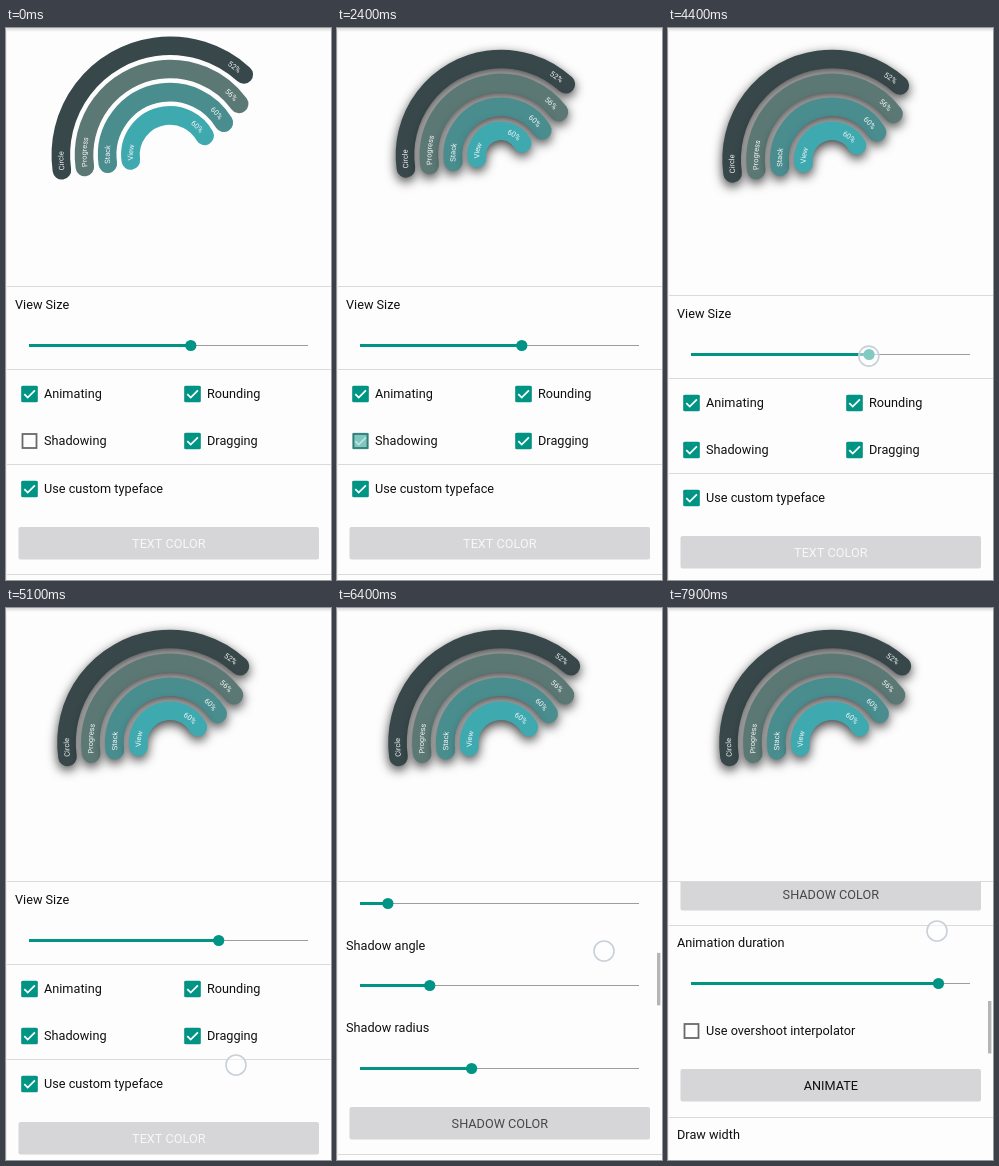
An HTML page with a canvas that plays this animation: 325x552 px, repeating every 8000 ms.

```html
<!DOCTYPE html>
<html lang="en">
<head>
<meta charset="utf-8">
<title>Arc progress settings</title>
<style>
  html, body { margin: 0; width: 100%; height: 100%; overflow: hidden; background: #fdfdfd; }
  canvas { display: block; width: 325px; height: 552px; }
</style>
</head>
<body>
<canvas id="stage"></canvas>
<script>
const W = 325, H = 552, LOOP = 8000, STEP = 100;
const TEAL = '#009485', INK = '#101010', PAPER = '#fdfdfd', RULE = '#dadada';
const RAD = Math.PI / 180, START = 172 * RAD, SLOP = 15;
const canvas = document.getElementById('stage');
const ctx = canvas.getContext('2d');
const dpr = window.devicePixelRatio || 1;
canvas.width = W * dpr;
canvas.height = H * dpr;

const ARCS = [
  { name: 'Circle', value: '52%', end: 312.5, color: '#37474a' },
  { name: 'Progress', value: '56%', end: 323.5, color: '#5b7874' },
  { name: 'Stack', value: '60%', end: 329, color: '#4a8d8f' },
  { name: 'View', value: '60%', end: 331, color: '#3fa9b0' }
];
const TAPS = [
  { start: 1200, end: 1300, from: [29, 433], to: [29, 443] },
  { start: 2200, end: 2300, from: [20, 423], to: [20, 423] }
];
// Each swipe drags the list, then flings it further until it rests
const SWIPES = [
  { start: 5100, end: 5600, from: [230, 457], to: [265, 340], fling: 81, rest: 6000 },
  { start: 6000, end: 6400, from: [250, 500], to: [267, 343], fling: 117, rest: 6900 },
  { start: 7400, end: 7900, from: [253, 450], to: [269, 323], fling: 0, rest: 8000 }
];

const ramp = (t, a, b) => Math.min(1, Math.max(0, (t - a) / (b - a)));
const smooth = p => p * p * (3 - 2 * p);
const easeOut = p => 1 - (1 - p) ** 2;
const mix = (a, b, p) => a + (b - a) * p;

const sizeAt = t => smooth(ramp(t, 3900, 4800));

function scrollAt(t) {
  return SWIPES.reduce((sum, s) => {
    const moved = (s.from[1] - s.to[1]) * ramp(t, s.start, s.end);
    return sum + Math.max(0, moved - SLOP) + s.fling * easeOut(ramp(t, s.end, s.rest));
  }, 0);
}

function barAlpha(t) {
  return Math.max(...SWIPES.map(s =>
    ramp(t, s.start, s.start + 100) * (1 - ramp(t, s.rest, s.rest + 200))));
}

function line(x1, y1, x2, y2, color, width) {
  ctx.strokeStyle = color;
  ctx.lineWidth = width;
  ctx.beginPath();
  ctx.moveTo(x1, y1);
  ctx.lineTo(x2, y2);
  ctx.stroke();
}

function disc(x, y, r, color) {
  ctx.fillStyle = color;
  ctx.beginPath();
  ctx.arc(x, y, r, 0, Math.PI * 2);
  ctx.fill();
}

function box(x, y, w, h, r, color) {
  ctx.fillStyle = color;
  ctx.beginPath();
  ctx.roundRect(x, y, w, h, r);
  ctx.fill();
}

function text(str, x, y, color = INK, align = 'left') {
  ctx.font = '12.7px Roboto, sans-serif';
  ctx.textAlign = align;
  ctx.fillStyle = color;
  ctx.fillText(str, x, Math.round(y + 4));
}

// Text along a circle; `angle` is where it starts, or ends if `fromEnd`
function arcText(str, r, angle, fromEnd) {
  ctx.font = '7.5px Roboto, sans-serif';
  ctx.textAlign = 'center';
  ctx.fillStyle = '#f2f6f6';
  let a = fromEnd ? angle - ctx.measureText(str).width / r : angle;
  for (const ch of str) {
    const w = ctx.measureText(ch).width / r;
    ctx.save();
    ctx.rotate(a + w / 2 + Math.PI / 2);
    ctx.fillText(ch, 0, 2.6 - r);
    ctx.restore();
    a += w;
  }
}

function chart(size, shadow) {
  const outer = (shadow ? 96 : 109.2) + 7.5 * size;
  const gap = shadow ? 23.9 : 23.2;
  ctx.save();
  ctx.translate(164, 127 + 7.5 * size);
  ctx.lineCap = 'round';
  ctx.lineWidth = 18.6;
  ARCS.forEach((arc, i) => {
    const r = outer - gap * i, end = arc.end * RAD;
    ctx.save();
    if (shadow) {
      ctx.shadowColor = 'rgba(0,0,0,.75)';
      ctx.shadowBlur = 11 * dpr;
      ctx.shadowOffsetY = 4 * dpr;
    }
    ctx.strokeStyle = arc.color;
    ctx.beginPath();
    ctx.arc(0, 0, r, START, end);
    ctx.stroke();
    ctx.restore();
    arcText(arc.name, r, START);
    arcText(arc.value, r, end - 5 / r, true);
  });
  ctx.restore();
}

function divider(y) {
  line(0, y, W, y, RULE, 1);
}

function slider(label, y, value) {
  const x = 23 + 279 * value, mid = Math.floor(y + 41) - .5;
  text(label, 9, y);
  line(23, mid, 302, mid, '#9c9e9e', 1);
  line(23, mid, x, mid, TEAL, 3);
  disc(x, mid, 5.6, TEAL);
}

function check(x, y, label, on) {
  ctx.strokeStyle = '#696969';
  ctx.lineWidth = 1.8;
  ctx.strokeRect(x - 7, y - 7, 14, 14);
  ctx.save();
  ctx.globalAlpha = on;
  box(x - 8.2, y - 8.2, 16.4, 16.4, 1.5, TEAL);
  ctx.strokeStyle = '#fff';
  ctx.lineWidth = 1.8;
  ctx.beginPath();
  ctx.moveTo(x - 5.2, y + .2);
  ctx.lineTo(x - 1.8, y + 3.6);
  ctx.lineTo(x + 5.4, y - 3.6);
  ctx.stroke();
  ctx.restore();
  text(label, x + 14.5, y);
}

function button(y, label, color) {
  box(12.5, y, 300.5, 32.5, 2, '#d6d5d7');
  text(label, 162.8, y + 16.7, color, 'center');
}

function settings(size, shadowCheck) {
  slider('View Size', 277, .58 + .1 * size);
  ['Animating', 'Rounding', 'Shadowing', 'Dragging'].forEach((label, i) => {
    const on = label === 'Shadowing' ? shadowCheck : 1;
    check(23.5 + 163 * (i % 2), 366 + 47 * (i >> 1), label, on);
  });
  check(23.5, 461, 'Use custom typeface', 1);
  button(499, 'TEXT COLOR', '#f7f7f7');
  ['distance', 'angle', 'radius'].forEach((label, i) => {
    slider('Shadow ' + label, 565 + 82.6 * i, .1 + .15 * i);
  });
  button(809, 'SHADOW COLOR', '#484848');
  slider('Animation duration', 874, .887);
  check(23.5, 962, 'Use overshoot interpolator', 0);
  button(1000, 'ANIMATE', INK);
  text('Draw width', 9, 1066);
  [341.5, 436.5, 546.5, 856.5, 1048.5].forEach(divider);
}

function touch(x, y) {
  disc(x, y, 10, 'rgba(255,255,255,.5)');
  ctx.strokeStyle = '#c9d0d8';
  ctx.lineWidth = 1.6;
  ctx.stroke();
}

function touches(t, size) {
  if (t >= 3800 && t <= 4800) touch(184.5 + 28 * size, 324 + 7 * size);
  for (const { start, end, from, to } of [...TAPS, ...SWIPES]) {
    const p = ramp(t, start, end);
    if (t >= start && t <= end) touch(mix(from[0], to[0], p), mix(from[1], to[1], p));
  }
}

function draw(t) {
  const size = sizeAt(t), scroll = Math.round(scrollAt(t));
  const grow = Math.round(15 * size), top = 258.5 + grow;
  ctx.setTransform(dpr, 0, 0, dpr, 0, 0);
  ctx.fillStyle = PAPER;
  ctx.fillRect(0, 0, W, H);

  const edge = ctx.createLinearGradient(0, 0, 0, 4);
  edge.addColorStop(0, '#d9d9d9');
  edge.addColorStop(1, PAPER);
  ctx.fillStyle = edge;
  ctx.fillRect(0, 0, W, 4);
  chart(size, t >= 2400);

  ctx.save();
  ctx.beginPath();
  ctx.rect(0, top, W, H - top);
  ctx.clip();
  ctx.translate(0, grow - scroll);
  settings(size, ramp(t, 2300, 2500));
  ctx.restore();
  divider(top);
  line(.5, 0, .5, H, '#ececec', 1);

  ctx.globalAlpha = barAlpha(t);
  ctx.fillStyle = '#b5b5b5';
  ctx.fillRect(320, 276.6 + .21 * scroll, 3.4, 52.5);
  ctx.globalAlpha = 1;
  touches(t, size);
}

function frame() {
  const t = performance.now() % LOOP;
  draw(Math.floor(t / STEP) * STEP);
  requestAnimationFrame(frame);
}
frame();
</script>
</body>
</html>
```
